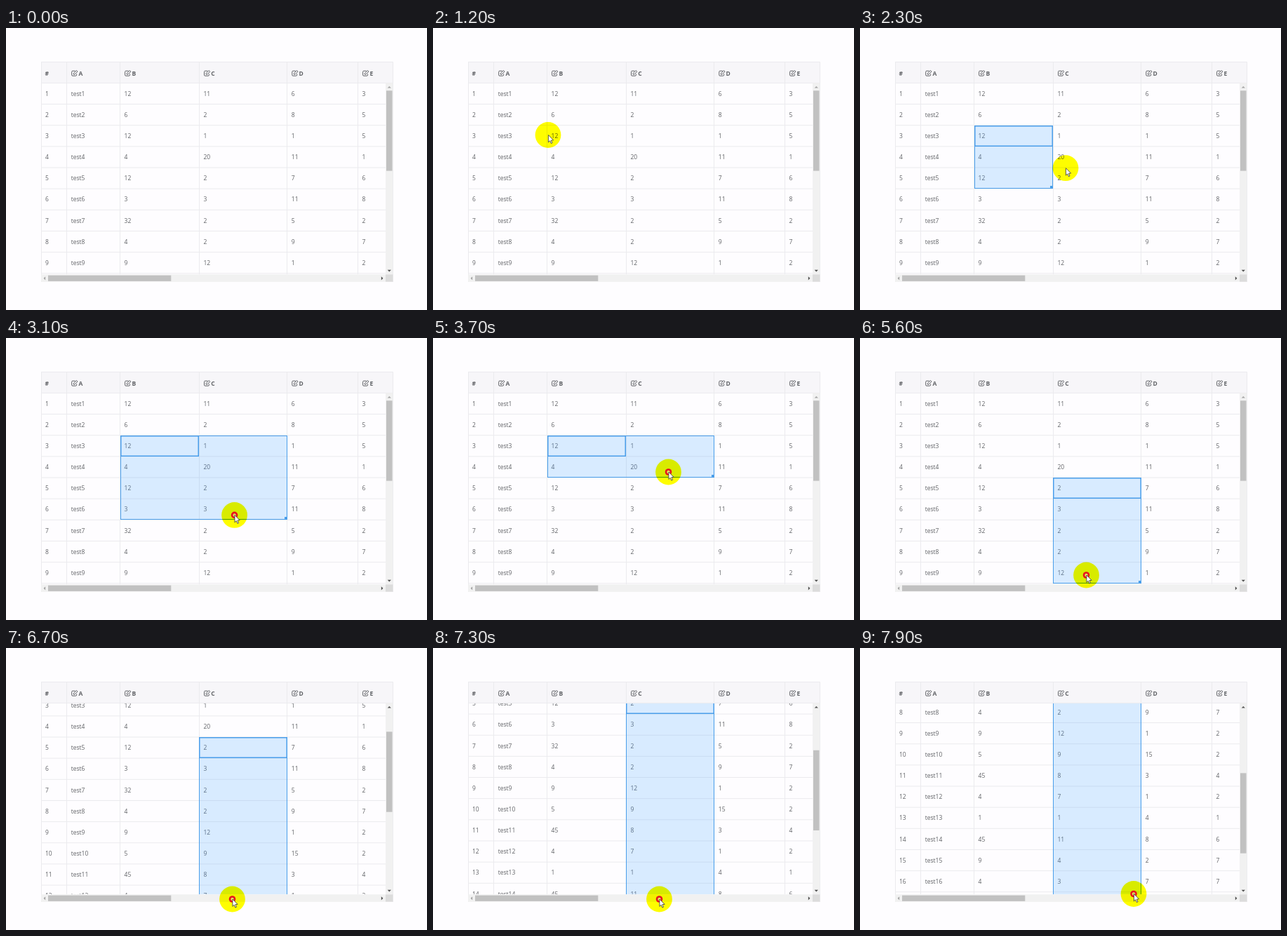
Write an HTML page with a canvas that moves like this. It is 600 by 402 pixels and loops after 8 s.

```html
<!DOCTYPE html>
<html lang="en">
<head>
<meta charset="utf-8">
<title>Table range selection</title>
<style>
html, body { margin: 0; width: 100%; height: 100%; overflow: hidden; background: #fefdff; }
canvas { display: block; width: 600px; height: 402px; }
</style>
</head>
<body>
<canvas id="stage"></canvas>
<script>
const W = 600, H = 402, LOOP = 8000, STEP = 100;
const canvas = document.getElementById('stage');
const ctx = canvas.getContext('2d');
const dpr = window.devicePixelRatio || 1;
canvas.width = W * dpr;
canvas.height = H * dpr;

const FONT = '8.5px "Open Sans", "Noto Sans", sans-serif';
const PAGE = '#fefdff', BLUE = '#4a9eea', LINE = '#ebebee', INK = '#606266';
const LEFT = 50, RIGHT = 551.5, TOP = 48.5, BODY = 78.4, BOTTOM = 351.3, ROW = 30.15;
const COLS = [50, 86.7, 162.6, 275.5, 400.8, 501.6, 602];
const HEADS = ['#', 'A', 'B', 'C', 'D', 'E'];

// Cell text, one string per column B to E
const TEXT = [
  '12 6 12 4 12 3 32 4 9 5 45 4 1 45 9 4',
  '11 2 1 20 2 3 2 2 12 9 8 7 1 11 4 3',
  '6 8 1 11 7 11 5 9 1 15 3 1 4 8 2 7',
  '3 5 5 1 6 8 2 7 2 2 4 2 1 6 7 7'
].map(column => column.split(' '));
const ROWS = TEXT[0].map((_, i) => [i + 1, 'test' + (i + 1), ...TEXT.map(column => column[i])]);

// Pointer stops: time, x, y
const STOPS = [
  [100, 388, 185], [400, 396, 184], [1000, 128, 149], [1400, 200, 156], [2200, 272, 214],
  [2300, 293, 199.7], [2500, 230, 160], [2900, 325, 256], [3000, 325, 256], [3700, 335.5, 191],
  [4400, 251, 121.5], [4600, 135, 130], [4800, 215, 250], [5200, 320, 212],
  [5600, 322.5, 338], [5800, 322.5, 358], [7500, 322.5, 358], [7900, 390, 350.5]
];
const DRAGS = [
  { from: 1400, to: 2100, col: 2, row: 2 },
  { from: 2500, to: 4800, col: 2, row: 2 },
  { from: 5200, to: LOOP, col: 3, row: 4 }
];

const EDIT_BOX = new Path2D('M5.6 1H1.9Q.6 1 .6 2.3V6.7Q.6 8 1.9 8H6.2Q7.5 8 7.5 6.7V5.3');
const PENCIL = new Path2D('M3.3 5.9V4.3L7.3.3L8.9 1.9L4.9 5.9Z');
const ARROW = new Path2D('M.4 0V10.4L2.7 8.2L4.3 12L6 11.3L4.4 7.6L7.6 7.4Z');

const ease = p => p * p * (3 - 2 * p);

function pointerAt(t) {
  const i = STOPS.findIndex(stop => stop[0] >= t);
  if (i <= 0) return STOPS[i ? STOPS.length - 1 : 0].slice(1);
  const [t0, x0, y0] = STOPS[i - 1], [t1, x1, y1] = STOPS[i];
  const p = ease((t - t0) / (t1 - t0));
  return [x0 + (x1 - x0) * p, y0 + (y1 - y0) * p];
}

// Auto-scroll gathers speed while the pointer stays below the table
function scrollAt(t) {
  const s = Math.max(0, t - 5700) / 1000;
  return 51.3 * s + 20.7 * s * s;
}

function rect(x0, y0, x1, y1, color) {
  ctx.fillStyle = color;
  ctx.fillRect(x0, y0, x1 - x0, y1 - y0);
}

function frame(x0, y0, x1, y1, width) {
  ctx.strokeStyle = BLUE;
  ctx.lineWidth = width;
  ctx.strokeRect(x0 + width / 2, y0 + width / 2, x1 - x0 - width, y1 - y0 - width);
}

function disc(radius, color) {
  ctx.beginPath();
  ctx.arc(0, 0, radius, 0, Math.PI * 2);
  ctx.fillStyle = color;
  ctx.fill();
}

function label(text, x, y, bold) {
  ctx.font = (bold ? 'bold ' : '') + FONT;
  ctx.fillStyle = INK;
  ctx.fillText(text, x, y);
}

const vline = (x, y0, y1) => rect(Math.floor(x), y0, Math.floor(x) + 1, y1, LINE);
const hline = y => rect(LEFT, y - 0.5, RIGHT, y + 0.5, LINE);

function editIcon(x, y) {
  ctx.save();
  ctx.translate(x, y);
  ctx.strokeStyle = INK;
  ctx.stroke(EDIT_BOX);
  ctx.stroke(PENCIL);
  ctx.restore();
}

function selectionAt(t) {
  const drag = DRAGS.filter(d => t >= d.from).pop();
  if (!drag) return null;
  const held = Math.min(t, drag.to);
  const [x, y] = pointerAt(held);
  const col = COLS.findIndex((c, i) => x >= c && x < COLS[i + 1]);
  const row = Math.floor((Math.min(y, 349) + scrollAt(held) - BODY) / ROW);
  return {
    drag,
    c0: Math.min(col, drag.col), c1: Math.max(col, drag.col) + 1,
    r0: Math.min(row, drag.row), r1: Math.max(row, drag.row) + 1
  };
}

function drawSelection(t, rowY) {
  const s = selectionAt(t);
  if (!s) return;
  const { col, row } = s.drag;
  const snapX = c => Math.round(COLS[c] - 0.1), snapY = r => Math.round(rowY(r));
  const x0 = snapX(s.c0), x1 = snapX(s.c1), y0 = snapY(s.r0), y1 = snapY(s.r1);
  rect(x0, y0, x1, y1, 'rgba(64,158,255,0.2)');
  frame(x0, y0, x1, y1, 1);
  frame(snapX(col), snapY(row), snapX(col + 1), snapY(row + 1), 1.5);
  rect(x1 - 4, y1 - 4, x1, y1, BLUE);
}

function drawBody(t, scroll) {
  const rowY = r => BODY + r * ROW - scroll;
  ctx.save();
  ctx.beginPath();
  ctx.rect(LEFT, BODY, 541 - LEFT, BOTTOM - BODY);
  ctx.clip();
  ROWS.forEach((cells, r) => {
    cells.forEach((text, c) => label(text, COLS[c] + 6, rowY(r) + 18.3));
    hline(rowY(r + 1));
  });
  COLS.slice(1, 6).forEach(x => vline(x, BODY, BOTTOM));
  drawSelection(t, rowY);
  ctx.restore();
}

function drawHeader() {
  rect(LEFT, TOP, RIGHT, BODY, '#f7f6f9');
  hline(TOP);
  hline(BODY);
  HEADS.forEach((text, c) => {
    const x = COLS[c] + 6;
    if (c) {
      vline(COLS[c], TOP, BODY);
      editIcon(x + 0.4, 60.2);
    }
    label(text, c ? x + 10.8 : x - 0.4, 67.9, true);
  });
  [LEFT, RIGHT].forEach(x => vline(x, TOP, 362));
}

function drawScrollbars(scroll) {
  const track = '#f1f1f1', thumb = '#c1c1c1', offset = scroll * 0.418;
  const arrow = (x, y, turn, on) => {
    ctx.save();
    ctx.translate(x, y);
    ctx.rotate(turn * Math.PI / 2);
    ctx.fillStyle = on ? '#505050' : '#a3a3a3';
    ctx.fill(new Path2D('M-2.6 1.3H2.6L0 -1.3Z'));
    ctx.restore();
  };
  rect(541, BODY, 551.3, BOTTOM, track);
  rect(542, 89.3 + offset, 550.5, 203.6 + offset, thumb);
  rect(LEFT, BOTTOM, 541, 361.8, track);
  rect(60, 352.6, 235.3, 360.9, thumb);
  rect(541, BOTTOM, 551.3, 361.8, '#dcdcdc');
  arrow(546.3, 84.3, 0, scroll > 0);
  arrow(546.3, 346.1, 2, true);
  arrow(54.9, 356.8, 3, false);
  arrow(536.1, 356.8, 1, true);
}

function drawPointer(t) {
  if (t < STOPS[0][0]) return;
  ctx.save();
  ctx.translate(...pointerAt(t));
  ctx.globalCompositeOperation = 'multiply';
  disc(18.4, '#ffff00');
  ctx.globalCompositeOperation = 'source-over';
  if (DRAGS.some(d => t >= d.from && t <= d.to)) {
    disc(4.8, '#e8141c');
    disc(2.2, '#e6e060');
  }
  ctx.fillStyle = '#fff';
  ctx.fill(ARROW);
  ctx.strokeStyle = '#333';
  ctx.lineWidth = 0.8;
  ctx.stroke(ARROW);
  ctx.restore();
}

function draw(t) {
  const scroll = scrollAt(t);
  ctx.setTransform(dpr, 0, 0, dpr, 0, 0);
  ctx.lineWidth = 1;
  rect(0, 0, W, H, PAGE);
  drawBody(t, scroll);
  ctx.lineWidth = 1;
  drawHeader();
  drawScrollbars(scroll);
  drawPointer(t);
}

const start = performance.now();
function tick() {
  const t = (performance.now() - start) % LOOP;
  draw(Math.floor(t / STEP) * STEP);
  requestAnimationFrame(tick);
}
tick();
</script>
</body>
</html>
```
